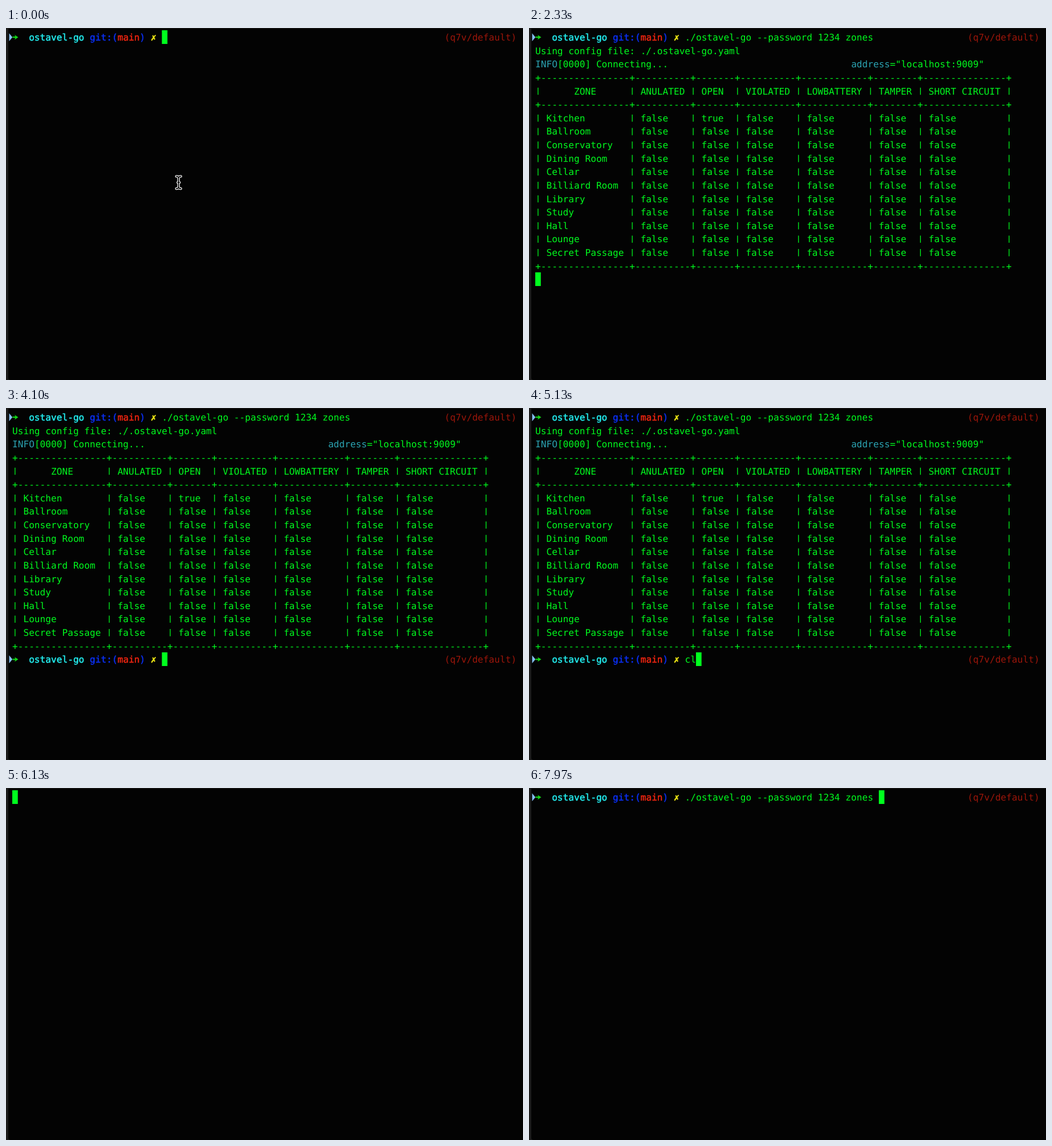
An HTML page that plays this animation: 907x618 px, repeating every 8000 ms.

```html
<!DOCTYPE html>
<html lang="en">
<head>
<meta charset="utf-8">
<title>Terminal session</title>
<style>
  html, body { margin: 0; width: 100%; height: 100%; overflow: hidden; background: #030303; }
  svg { display: block; }
  text {
    font: 16.15px "DejaVu Sans Mono", monospace;
    white-space: pre;
    text-rendering: geometricPrecision;
  }
  .strong { stroke: currentColor; stroke-width: 0.55px; }
</style>
</head>
<body>
<svg id="stage" width="907" height="618" viewBox="0 0 907 618">
  <rect width="907" height="618" fill="#1b1b1b"/>
  <path d="M4 1H907V618H8Q4 618 4 614Z" fill="#030303"/>
</svg>
<script>
const LOOP = 8000;
const LEFT = 11, TOP = 4, CELL = 9.722, LINE = 23.62, BASE = 18.1;
const GREEN = '#00fa1e', TEAL = '#2ba3b2';
const APP = 'ostavel-go';
const COMMAND = `./${APP} --password 1234 zones`;
const INPUT = 27;
const LAST = 18;

const stage = document.getElementById('stage');
const colX = col => LEFT + col * CELL;
const rowY = row => TOP + row * LINE;

function add(parent, tag, attrs = {}, content = '') {
  const node = document.createElementNS('http://www.w3.org/2000/svg', tag);
  for (const key in attrs) node.setAttribute(key, attrs[key]);
  node.textContent = content;
  return parent.appendChild(node);
}

function write(parent, row, col, content, fill = GREEN, strong = false) {
  return add(parent, 'text', {
    x: colX(col), y: rowY(row) + BASE, fill, color: fill, class: strong ? 'strong' : ''
  }, content);
}

function block(parent, width, fill) {
  return add(parent, 'rect', { width: width * CELL, height: 24, fill });
}

function place(node, row, col) {
  node.setAttribute('x', colX(col));
  node.setAttribute('y', Math.round(rowY(row)));
}

function show(node, visible) {
  node.setAttribute('visibility', visible ? 'visible' : 'hidden');
}

function makePrompt(row) {
  const group = add(stage, 'g');
  const y = rowY(row) + 12.2;
  add(group, 'path', { d: `M5.5 ${y - 7}L11.3 ${y}L5.5 ${y + 7}Z`, fill: '#84bdf0' });
  add(group, 'path', {
    d: `M11.5 ${y - 1.1}H16.3L15 ${y - 4.2}L21.5 ${y}L15 ${y + 4.2}L16.3 ${y + 1.1}H11.5Z`,
    fill: '#12d818'
  });
  write(group, row, 3, APP, '#22e8ea', true);
  write(group, row, 14, 'git:(', '#0a2ff0', true);
  write(group, row, 19, 'main', '#ea2410', true);
  write(group, row, 23, ')', '#0a2ff0', true);
  write(group, row, 25, '✗', '#eee614', true);
  write(group, row, 78, '(q7v/default)', '#9c160a');
  return group;
}

function makeOutput() {
  const group = add(stage, 'g');
  write(group, 1, 0, `Using config file: ./.${APP}.yaml`);
  write(group, 2, 0, 'INFO', TEAL);
  write(group, 2, 4, '[0000] Connecting...');
  write(group, 2, 57, 'address', TEAL);
  write(group, 2, 64, '="localhost:9009"');

  const heads = ['     ZONE     ', 'ANULATED', 'OPEN ', 'VIOLATED',
    'LOWBATTERY', 'TAMPER', 'SHORT CIRCUIT'];
  const zones = ['Kitchen', 'Ballroom', 'Conservatory', 'Dining Room', 'Cellar',
    'Billiard Room', 'Library', 'Study', 'Hall', 'Lounge', 'Secret Passage'];
  const rule = '+' + heads.map(head => '-'.repeat(head.length + 2) + '+').join('');
  const isOpen = (zone, col) => zone === 'Kitchen' && col === 2;

  // Column bars are short strokes, so the cells leave a blank where each bar stands.
  const writeCells = (row, cells) => {
    const line = cells.map((cell, i) => `  ${cell.padEnd(heads[i].length)} `).join('');
    write(group, row, 0, line);
    [...rule].forEach((mark, col) => {
      if (mark !== '+') return;
      add(group, 'path', {
        d: `M${colX(col + 0.5)} ${rowY(row) + 6.2}v12.6`, stroke: GREEN, 'stroke-width': 1.3
      });
    });
  };

  [3, 5, 17].forEach(row => write(group, row, 0, rule));
  writeCells(4, heads);
  zones.forEach((zone, i) =>
    writeCells(6 + i, heads.map((_, col) => col ? String(isOpen(zone, col)) : zone)));
  return group;
}

function makePointer() {
  const group = add(stage, 'g', { fill: 'none', 'stroke-linecap': 'round' });
  const d = 'M298.8 260.4Q302.8 260.4 302.8 264V278.4Q302.8 282 298.8 282' +
    'M306.8 260.4Q302.8 260.4 302.8 264M302.8 278.4Q302.8 282 306.8 282M301.3 271.2H304.3';
  add(group, 'path', { d, stroke: '#f4f4f4', 'stroke-width': 4.4 });
  add(group, 'path', { d, stroke: '#050505', 'stroke-width': 1.8 });
  return group;
}

const highlight = block(stage, COMMAND.length, '#00c40a');
place(highlight, 0, INPUT);
const cursor = block(stage, 1, '#00ff1e');
const firstPrompt = makePrompt(0);
const secondPrompt = makePrompt(LAST);
const command = write(stage, 0, INPUT, COMMAND);
const typed = write(stage, LAST, INPUT, '');
const output = makeOutput();
const pointer = makePointer();

const PASTE = 1000, ENTER = 2000, RESULT = 2130, DONE = 2500;
const CLEAR = 6130, READY = 6200, PASTE_AGAIN = 7400, SPACE = 7930;
const KEYS = [4930, 5060, 5170, 5300, 5400];

function cursorCell(t, keys) {
  if (t < PASTE) return [0, INPUT];
  if (t < ENTER) return [0, INPUT + COMMAND.length];
  if (t < RESULT) return [1, 0];
  if (t < DONE) return [LAST, 0];
  if (t < CLEAR) return [LAST, INPUT + keys];
  if (t < READY) return [0, 0];
  if (t < PASTE_AGAIN) return [0, INPUT];
  return [0, INPUT + COMMAND.length + (t >= SPACE ? 1 : 0)];
}

function render(t) {
  const within = (from, to) => t >= from && t < to;
  const pasted = within(PASTE, ENTER) || within(PASTE_AGAIN, SPACE);
  const keys = KEYS.filter(time => t >= time).length;

  show(pointer, t < ENTER);
  show(firstPrompt, !within(CLEAR, READY));
  show(command, within(PASTE, CLEAR) || t >= PASTE_AGAIN);
  command.setAttribute('fill', pasted ? '#041004' : GREEN);
  show(highlight, pasted);
  show(output, within(RESULT, CLEAR));
  show(secondPrompt, within(DONE, CLEAR));
  show(typed, within(DONE, CLEAR));
  typed.textContent = 'clear'.slice(0, keys);
  place(cursor, ...cursorCell(t, keys));
}

const start = performance.now();
function tick() {
  render((performance.now() - start) % LOOP);
  requestAnimationFrame(tick);
}
tick();
</script>
</body>
</html>
```
